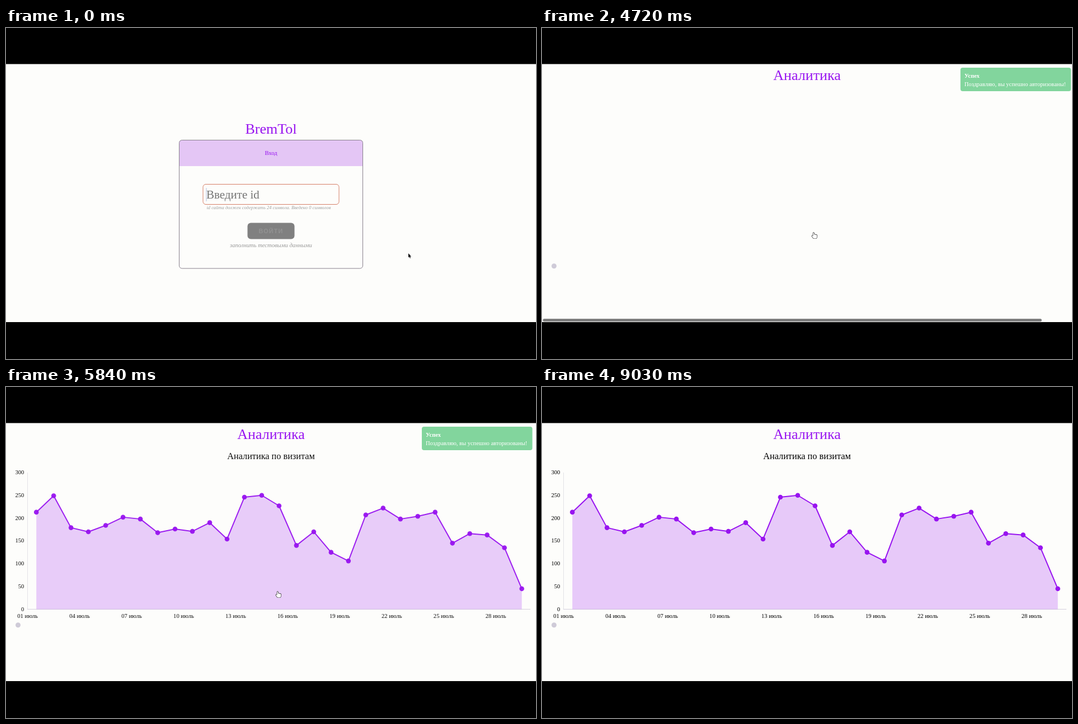
Animation of 947x592 px, one loop 9850 ms. Source, as an HTML page with a canvas:

```html
<!DOCTYPE html>
<html lang="ru">
<head>
<meta charset="utf-8">
<style>
html, body { margin: 0; width: 100%; height: 100%; overflow: hidden; background: #000; }
canvas { display: block; }
</style>
</head>
<body>
<canvas id="stage" width="947" height="592"></canvas>
<script>
const ctx = document.getElementById('stage').getContext('2d');
const LOOP = 9850, W = 947, MID = 473.5;
const PURPLE = '#9814f0', PAPER = '#fdfdfb';
const SERIF = '"Liberation Serif", "Times New Roman", serif';
const SANS = '"Liberation Sans", Arial, sans-serif';
const visits = [213, 249, 179, 170, 184, 202, 198, 168, 176, 171, 190, 154, 246, 250, 227,
  140, 170, 125, 106, 207, 222, 198, 204, 213, 145, 166, 163, 135, 45];

const progress = (t, from, to) => Math.min(1, Math.max(0, (t - from) / (to - from)));
const easeOut = p => 1 - (1 - p) ** 3;
const easeInOut = p => p * p * (3 - 2 * p);
const lerp = (a, b, p) => a + (b - a) * p;
const mix = (a, b, p) => `rgb(${a.map((v, i) => Math.round(lerp(v, b[i], p)))})`;

function text(str, x, y, size, color, align = 'center', style = '', family = SERIF) {
  ctx.font = `${style} ${size}px ${family}`;
  ctx.textAlign = align;
  ctx.fillStyle = color;
  ctx.fillText(str, x, y);
}

function box(x, y, w, h, radius, fill, stroke) {
  ctx.beginPath();
  ctx.roundRect(x, y, w, h, radius);
  if (fill) { ctx.fillStyle = fill; ctx.fill(); }
  if (stroke) { ctx.strokeStyle = stroke; ctx.lineWidth = 1; ctx.stroke(); }
}

function shape(path, x, y, fill, stroke, width) {
  const p = new Path2D(path);
  ctx.save();
  ctx.translate(x, y);
  ctx.fillStyle = fill;
  ctx.strokeStyle = stroke;
  ctx.lineWidth = width;
  ctx.lineJoin = 'round';
  ctx.stroke(p);
  ctx.fill(p);
  ctx.restore();
}

const arrow = (x, y) => shape('M0 0V7.6L1.7 6.1 2.8 8.8 4 8.3 2.9 5.7H5Z', x, y, '#000', '#fff', 1);
const hand = (x, y) => shape(
  'M-2.6 1V-4.4Q-1.7-5.8-.8-4.4V-1.6Q.3-2.4 1-1.3 2-2 2.7-.9 4-1.3 4.4 0V2.4L3.3 5.4H-1.8L-4.7 1.6Q-5-.2-3.6.2Z',
  x, y, '#fff', '#222', 1.3);

function loginPage(t) {
  const filled = progress(t, 2430, 2600);
  const pressed = t < 4120 ? progress(t, 3640, 3820) : 0;

  text('BremTol', MID, 188.5, 26, PURPLE);
  box(309.5, 200.5, 328, 46.5, [5, 5, 0, 0], '#e4c6f5');
  box(309.5, 200.5, 328, 229.5, 5, null, '#88808c');
  text('Вход', MID, 227, 10.6, PURPLE);

  box(352, 279.5, 243, 36, 5, null, mix([213, 128, 104], [134, 205, 156], filled));
  if (t < 2430) {
    text('Введите id', 358, 305, 21, '#757575', 'left');
    text('id сайта должен содержать 24 символа. Введено 0 символов',
      358.5, 323.5, 8.5, '#a0a0a0', 'left', 'italic');
    if (t < 360 || Math.floor((t - 360) / 510) % 2) {
      ctx.fillStyle = '#b4bfe0';
      ctx.fillRect(357.5, 286, 1, 24);
    }
  } else {
    ctx.save();
    ctx.beginPath();
    ctx.rect(357, 281, 232.5, 33);
    ctx.clip();
    text('5f8475902b0be670555f1bb84', 358, 305, 21, '#a9a9a9', 'left');
    ctx.restore();
  }

  const active = mix([152, 20, 246], [142, 20, 228], pressed);
  box(431.5, 348.5, 84, 29, 6, filled < 1 ? mix([128, 128, 128], [152, 20, 246], filled) : active);
  ctx.letterSpacing = '1.2px';
  text('ВОЙТИ', 451.5, 367, 10.8, mix([146, 146, 146], [250, 240, 255], filled), 'left', 'bold', SANS);
  ctx.letterSpacing = '0px';
  text('заполнить тестовыми данными', MID, 392, 10.6, '#999', 'center', 'italic');

  const toLink = easeInOut(progress(t, 870, 1980));
  const toButton = easeInOut(progress(t, 3030, 3450));
  const x = lerp(719, 503, toLink) - 16 * toButton;
  const y = lerp(404, 396, toLink) - 25 * toButton;
  if (x < 548) hand(x, y); else arrow(x, y - 1);
}

function chart(t) {
  const grow = easeOut(progress(t, 4712, 5802));
  const px = i => 54.2 + i * 30.98;
  const py = v => 397.5 - v * 0.815;
  const points = visits.map((v, i) => [px(i), py(v * grow)]);

  ctx.save();
  const alpha = ctx.globalAlpha = easeOut(progress(t, 4725, 6525));
  text('Аналитика по визитам', MID, 128.5, 16.25, '#000');
  ctx.fillStyle = '#e3e2e6';
  ctx.fillRect(38, 153, 1, 244);
  ctx.fillStyle = '#d3cfdc';
  ctx.fillRect(38, 397, 899, 1);
  for (let v = 0; v <= 300; v += 50) text(v, 32.3, py(v) + 3, 10.6, '#000', 'right');
  for (let k = 0; k < 10; k++) {
    text(String(1 + 3 * k).padStart(2, '0') + ' июль', 38.6 + 92.95 * k, 413.3, 10.6, '#000');
  }

  ctx.beginPath();
  points.forEach(p => ctx.lineTo(...p));
  ctx.strokeStyle = PURPLE;
  ctx.lineWidth = 2;
  ctx.lineJoin = 'round';
  ctx.stroke();
  ctx.lineTo(px(28), 397.5);
  ctx.lineTo(px(0), 397.5);
  ctx.globalAlpha = alpha * 0.225;
  ctx.fillStyle = PURPLE;
  ctx.fill();
  ctx.globalAlpha = alpha;
  for (const [x, y] of points) {
    ctx.beginPath();
    ctx.arc(x, y, 4.3, 0, 7);
    ctx.fill();
  }
  ctx.restore();
}

function toast(t) {
  const shift = t < 6000
    ? 210 * (1 - easeOut(progress(t, 4340, 4870)))
    : 210 * progress(t, 7380, 7910) ** 2;
  if (shift >= 210) return;
  const x = 743 + shift;
  box(x, 71, 197.5, 42, 4, '#82d59d');
  text('Успех', x + 7, 89, 10.5, '#fff', 'left', 'bold');
  text('Поздравляю, вы успешно авторизованы!', x + 7, 103.5, 10.5, '#fff', 'left');

  // The overlay scrollbar lingers briefly after the toast has settled.
  const overflow = shift - 7;
  if (t < 4980 || overflow > 0) {
    ctx.globalAlpha = t < 6000 ? 1 - progress(t, 4800, 4980) : progress(t, 7440, 7540);
    box(1.5, 520, W * W / (W + Math.max(58, overflow)) - 1, 5, 2.5, '#7d7d7d');
    ctx.globalAlpha = 1;
  }
}

function analyticsPage(t) {
  text('Аналитика', MID, 93, 26, PURPLE);
  if (t >= 4600) {
    ctx.beginPath();
    ctx.arc(21.5, 425.7, 4.5, 0, 7);
    ctx.fillStyle = '#cfcbd8';
    ctx.fill();
  }
  chart(t);
  toast(t);
  if (t < 5900) hand(487, 371);
}

function draw(now) {
  const t = now % LOOP;
  ctx.fillStyle = '#000';
  ctx.fillRect(0, 0, W, 592);
  ctx.save();
  ctx.beginPath();
  ctx.rect(0, 64.5, W, 461.5);
  ctx.clip();
  ctx.fillStyle = PAPER;
  ctx.fillRect(0, 64, W, 462);
  if (t < 4290) loginPage(t); else analyticsPage(t);
  ctx.restore();
  requestAnimationFrame(() => draw(performance.now() - start));
}

const start = performance.now();
draw(0);
</script>
</body>
</html>
```
